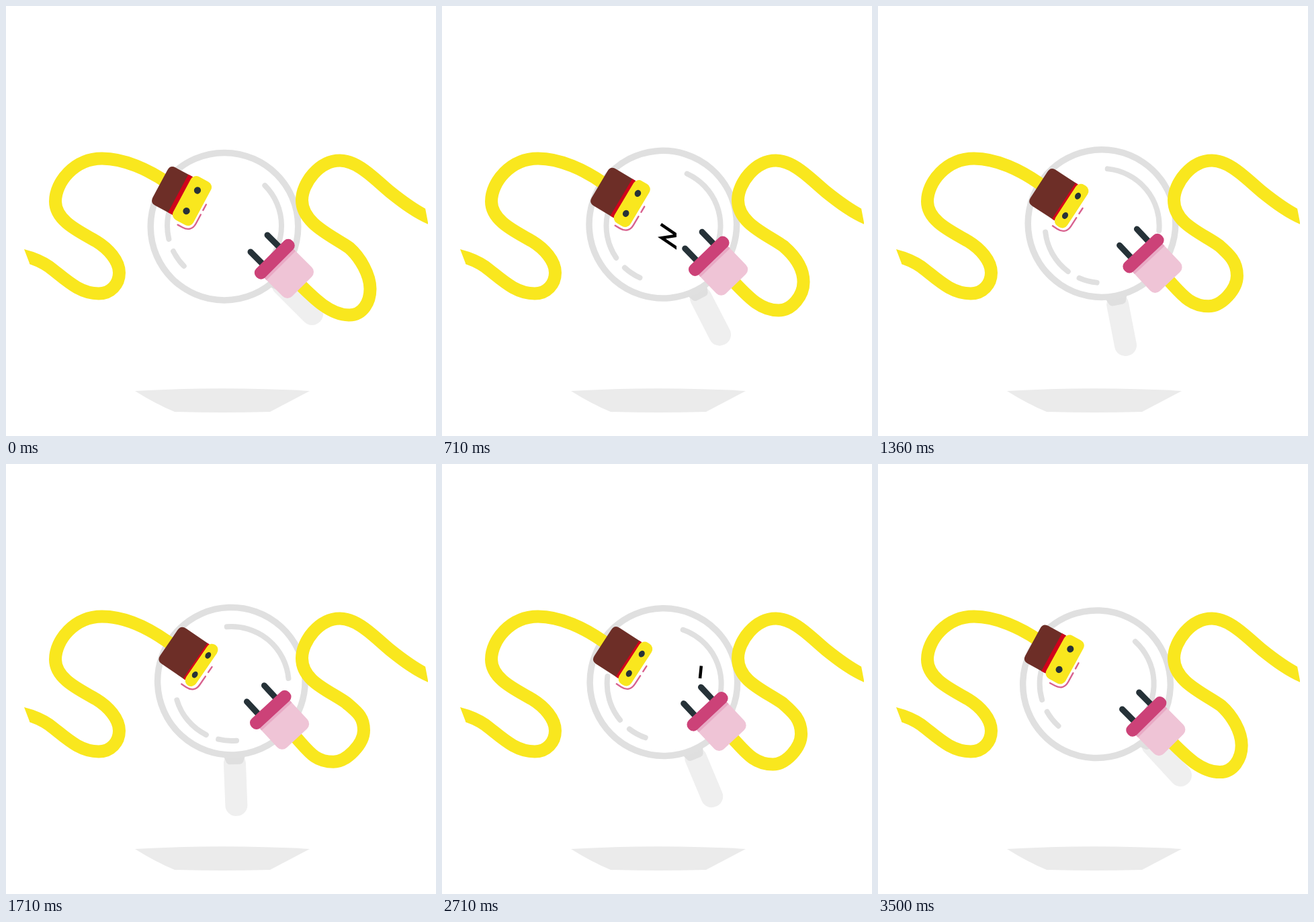
These frames come from a looping animation (640x640 px, 3.57 s). An HTML page:

```html
<!DOCTYPE html>
<html lang="en">
<head>
<meta charset="utf-8">
<title>Unplugged</title>
<style>
  html, body { margin: 0; width: 100%; height: 100%; overflow: hidden; background: #fff; }
  svg { display: block; width: 100%; height: 100%; }
  .line { fill: none; }
  .cable { stroke: #f9e71e; stroke-width: 19; }
  .shine { stroke: #e0e0e0; stroke-width: 8; stroke-linecap: round; }
  .spark { stroke: #d8628f; stroke-width: 2.4; stroke-linecap: round; }
  .bolt { stroke: #000; stroke-width: 4.5; stroke-miterlimit: 10; }
  .prong { stroke: #263238; stroke-width: 9; stroke-linecap: round; }
</style>
</head>
<body>
<svg viewBox="0 0 640 640">
  <defs>
    <clipPath id="ends"><path d="M27 362 35 383V640H628V322L624 301V0H27Z"/></clipPath>
    <clipPath id="boltBox"><path d="M300 300H349V380H300Z"/></clipPath>
  </defs>

  <path fill="#ebebeb" d="M192 573Q322 565.5 452 573L393 604Q322 606 251 604Q222 592 192 573Z"/>

  <g id="glass">
    <rect x="319.8" y="430" width="33" height="94" rx="16" fill="#efefef"/>
    <path fill="#dfdfdf" d="M319.5 433 324 444Q326 447 329 447H344Q347 447 349 444L353 433Z"/>
    <circle cx="336" cy="323.2" r="109.8" fill="#fff" stroke="#e0e0e0" stroke-width="9.5"/>
  </g>
  <g id="shine"></g>

  <g clip-path="url(#ends)">
    <path id="leftCable" class="line cable"/>
    <path id="rightCable" class="line cable"/>
  </g>

  <g id="socket">
    <path id="shell" fill="#6d2e27"/>
    <rect id="band" y="-32" height="64" fill="#d0021b"/>
    <rect id="face" x="0" y="-36.5" height="73" fill="#f9e71e"/>
    <ellipse class="hole" cy="-17.5" ry="5.2" fill="#263238"/>
    <ellipse class="hole" cy="17.3" ry="5.2" fill="#263238"/>
    <path id="spark" class="line spark" d="M15 41.5H23C33 41.5 38 36 38 27V12M38 4.5V-5"/>
  </g>

  <g id="plug">
    <path class="line prong" d="M-32.5-17.7H-6M-32.5 17.7H-6"/>
    <rect x="0" y="-30.6" width="58" height="61.2" rx="10" fill="#efc4d6"/>
    <rect x="5" y="-30.6" width="9" height="61.2" fill="#e8aac5"/>
    <rect x="-9" y="-38" width="18.8" height="76" rx="8.5" fill="#cc4278"/>
  </g>

  <g clip-path="url(#boltBox)"><path class="line bolt" d="M320 321 350 341.5 327 345 362 369"/></g>
  <path class="line bolt" d="M384 319 388 279 402 298 407 255"/>
</svg>

<script>
  const LOOP = 3570;
  const CYCLE = 3600; // the swing is cut just before it closes
  const $ = id => document.getElementById(id);
  const all = sel => [...document.querySelectorAll(sel)];
  const set = (el, attrs) => { for (const k in attrs) el.setAttribute(k, attrs[k]); };
  const mix = (a, b, p) => a + (b - a) * p;
  const clamp = v => Math.max(0, Math.min(1, v));
  // rises to 1 at the peak, then falls back to 0
  const tent = (u, peak) => u < peak ? u / peak : (1 - u) / (1 - peak);

  const R = 85;
  const polar = deg => {
    const a = deg * Math.PI / 180;
    return (R * Math.cos(a)).toFixed(2) + ' ' + (R * Math.sin(a)).toFixed(2);
  };
  $('shine').innerHTML = [[-97.4, -8], [113.9, 160.8], [82.5, 100.8]]
    .map(([a, b]) => `<path class="line shine" d="M${polar(a)}A${R} ${R} 0 0 1 ${polar(b)}"/>`).join('');

  const holes = all('.hole');
  // start drawing, fully drawn, start erasing, gone
  const boltTimes = [[300, 650, 700, 860], [2650, 3000, 3140, 3350]];
  const bolts = all('.bolt').map((el, i) => ({ el, len: el.getTotalLength(), times: boltTimes[i] }));

  function drawGlass(u) {
    const tilt = 45 * (1 - tent(u, 0.5));
    set($('glass'), { transform: `rotate(${-tilt} 336.5 339)` });
    set($('shine'), { transform: `translate(${336.4 - 0.253 * tilt} 327) rotate(${1.17 * tilt})` });
  }

  function drawSocket(p) {
    const len = mix(37, 53.5, p), depth = mix(34, 13.4, p), band = mix(6.5, 1.6, p);
    set($('socket'), { transform: `translate(${262 + 27.5 * p} ${282 + 15.6 * p}) rotate(${28.2 + 7.8 * p})` });
    set($('shell'), { d: `M1-32H${9 - len}Q${-len}-32 ${-len}-23V23Q${-len} 32 ${9 - len} 32H1Z` });
    set($('band'), { x: -band, width: band + 1 });
    set($('face'), { width: depth, rx: Math.min(9, depth / 2), ry: 9 });
    holes.forEach(h => set(h, { cx: depth * 0.49, rx: mix(5.1, 3.7, p) }));
    set($('spark'), { transform: `translate(${-18.8 * p} ${-1.8 * p})` });
    set($('leftCable'), {
      d: 'M20 370C38 374 51 379 64 388C88 406 108 428 138 428' +
         'C156 428 168.5 414 168.5 397C168.5 379 152 361 134 350' +
         'C110 336 73.5 320 73.5 291C73.5 262 102 227 143 227' +
         `C175 227 212 243 ${243 + 6 * p} ${265 + 6 * p}`
    });
  }

  function drawPlug(p) {
    const x = 399.5 - 7.6 * p, y = 376.5 - 13.8 * p, turn = 45 + 2.9 * p;
    set($('plug'), { transform: `translate(${x} ${y}) rotate(${turn})` });
    const a = turn * Math.PI / 180;
    const at = s => `${x + s * Math.cos(a)} ${y + s * Math.sin(a)}`;
    const mx = 511 - 6 * p, my = 360 - 6 * p;
    const rx = 542 - 12 * p, ry = 421 - 31 * p;
    const bx = 511 - 30 * p, by = 460 - 21 * p;
    set($('rightCable'), {
      d: 'M634 317C612 308 592 293 572 277C549 258 524 230 497 230' +
         'C466 230 440.5 264 440.5 289' +
         `C440.5 324 ${mx - 25} ${my - 18} ${mx} ${my}` +
         `C${mx + 16} ${my + 14} ${rx} ${ry - 21} ${rx} ${ry}` +
         `C${rx} ${ry + 20} ${bx + 20} ${by} ${bx} ${by}` +
         `C${bx - 28} ${by} ${at(84)} ${at(52)}`
    });
  }

  function drawBolts(t) {
    for (const { el, len, times: [a, b, c, d] } of bolts) {
      const head = clamp((t - a) / (b - a)) * len;
      const tail = clamp((t - c) / (d - c)) * len;
      el.style.display = head - tail > 0.1 ? '' : 'none';
      el.style.strokeDasharray = `0 ${tail} ${head - tail} ${2 * len}`;
    }
  }

  const start = performance.now();
  function frame() {
    const t = (performance.now() - start) % LOOP, u = t / CYCLE;
    const p = tent(u, 0.6);
    drawGlass(u);
    drawSocket(p);
    drawPlug(p);
    drawBolts(t);
    requestAnimationFrame(frame);
  }
  frame();
</script>
</body>
</html>
```
